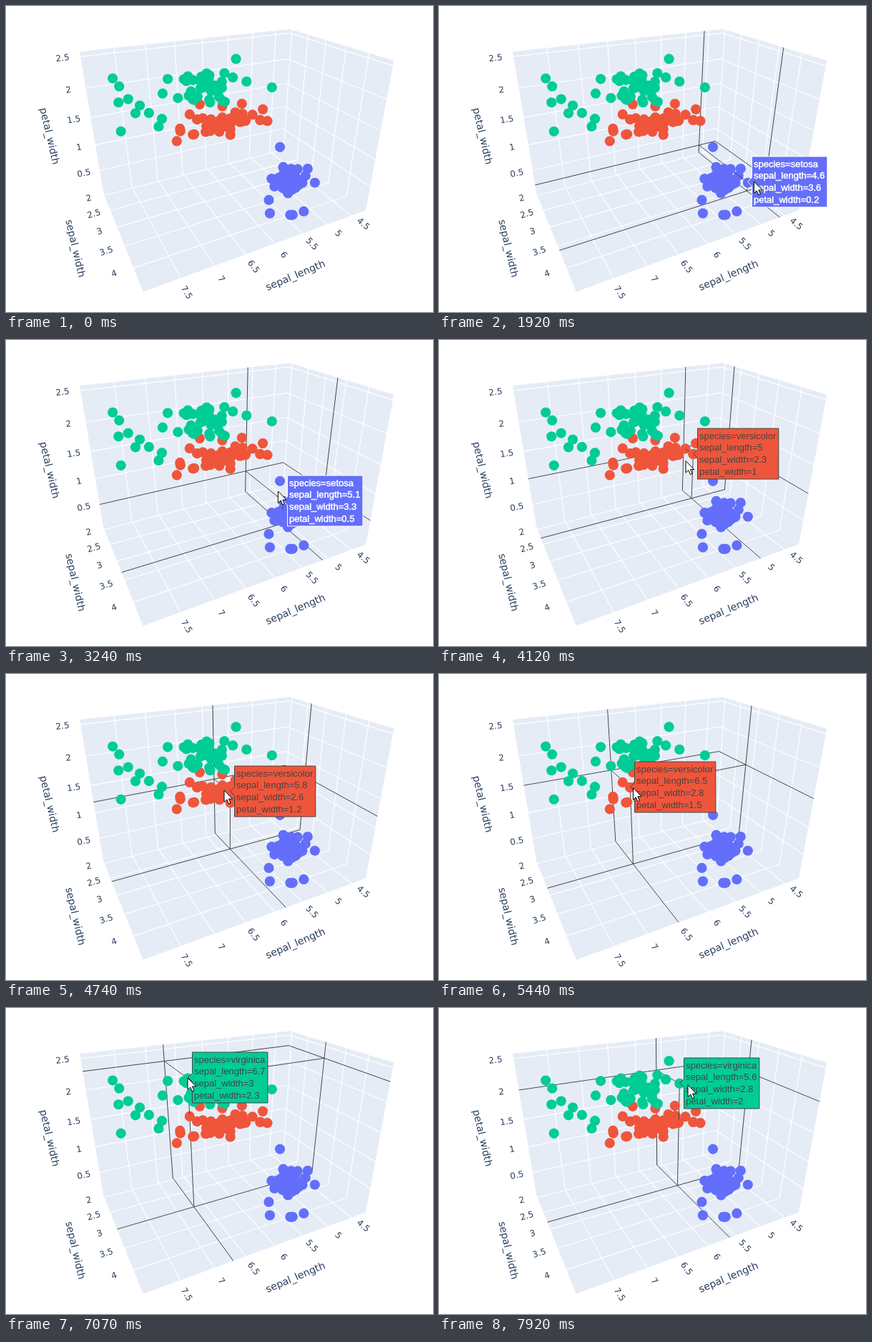
Write an HTML page with a canvas that moves like this. It is 597 px wide and 429 px high and loops after 8 s.

```html
<!DOCTYPE html>
<html lang="en">
<head>
<meta charset="utf-8">
<title>Iris 3D scatter</title>
<style>
html, body { margin: 0; width: 100%; height: 100%; overflow: hidden; background: #fff; }
canvas { display: block; }
</style>
</head>
<body>
<canvas id="stage" width="597" height="429"></canvas>
<script>
const ctx = document.getElementById('stage').getContext('2d');
const LOOP = 8000, STEP = 78;

// All measures are in tenths. Tick labels sit beside an edge of the box,
// shifted and turned a little more with every tick.
const axes = [
  { name: 'sepal_length', low: 41.875, span: 38.25, ticks: [45, 75], edge: [0, 1, 0],
    dx: i => 16 - 1.35 * i, dy: i => 12 + 1.4 * i, turn: i => 41 + 3 * i, title: [405, 378.5, -23] },
  { name: 'sepal_width', low: 19.25, span: 25.5, ticks: [20, 40], edge: [1, 0, 0],
    dx: i => -21.5 - 1.4 * i, dy: i => 4.5 + i, turn: i => -15 - i, title: [96, 340, 77] },
  { name: 'petal_width', low: 0.25, span: 25.5, ticks: [5, 25], edge: [1, 0, 0],
    dx: i => -22 - 0.75 * i, dy: i => 4.5 - 0.4 * i, turn: i => i - 11, title: [60, 182.5, 77] }
];

// Each species: a random cloud around its mean, and the flowers that stand apart
const species = [
  { name: 'setosa', color: '#636efa', ink: '#fff', bold: true,
    count: 36, mean: [49.5, 33.8, 2.4], spread: [5, 4.5, 1.5],
    apart: [[43, 30, 1], [57, 44, 4], [55, 42, 2], [52, 41, 1], [58, 40, 2], [57, 38, 3],
      [54, 34, 4], [54, 39, 4]] },
  { name: 'versicolor', color: '#ef553b', ink: '#444',
    count: 34, mean: [59.5, 27.8, 13], spread: [6, 4, 2.6],
    apart: [[70, 32, 14], [68, 28, 14], [67, 31, 14], [69, 31, 15], [67, 30, 17], [66, 29, 13],
      [49, 24, 10], [50, 20, 10], [52, 27, 14], [62, 22, 15], [60, 22, 10], [60, 34, 16], [59, 32, 18]] },
  { name: 'virginica', color: '#00cc96', ink: '#444',
    count: 26, mean: [64, 30, 20.5], spread: [5, 4, 3.5],
    apart: [[77, 26, 23], [77, 28, 20], [77, 30, 23], [77, 38, 22], [79, 38, 20], [76, 30, 21],
      [74, 28, 19], [73, 29, 18], [72, 36, 25], [72, 32, 18], [72, 30, 16], [71, 30, 21],
      [49, 25, 17], [57, 25, 20], [58, 28, 24], [60, 22, 15], [67, 25, 18], [63, 34, 24]] }
];

// Pointer strokes: where each ends, and the flowers touched on the way
const entry = { x: 527, y: 429 };
const moves = [
  { from: 980, to: 1750, x: 460, y: 250, touch: [] },
  { from: 1830, to: 2160, x: 411, y: 240, touch: [[46, 36, 2], [48, 34, 2]] },
  { from: 2300, to: 2700, x: 388, y: 227, touch: [[50, 34, 4], [51, 33, 5]] },
  { from: 3090, to: 3880, x: 360, y: 172, touch: [[51, 33, 5], [45, 23, 3], [50, 23, 10]] },
  { from: 3960, to: 4740, x: 305, y: 163, touch: [[50, 23, 10], [55, 25, 13], [58, 26, 12]] },
  { from: 4820, to: 5600, x: 264, y: 159, touch: [[60, 27, 16], [65, 28, 15]] },
  { from: 5660, to: 5820, x: 261, y: 159, touch: [[65, 28, 15]] },
  { from: 6290, to: 6670, x: 270, y: 106, touch: [[63, 25, 19], [65, 30, 22]] },
  { from: 6840, to: 7070, x: 254, y: 98, touch: [[65, 30, 22], [67, 30, 23]] },
  { from: 7770, to: 7920, x: 348, y: 108, touch: [[64, 28, 22], [56, 28, 20]] }
];

// Perspective of the unit cube: screen place of the back corner, and of the ends
// of the three edges leaving it, each with its weight
const corner = [385.6, 199.5];
const ends = [[136.3, 262.6, 0.821], [503, 286.5, 0.769], [396.7, 32.2, 0.869]];

function project(p) {
  let w = 1 - p[0] - p[1] - p[2], x = w * corner[0], y = w * corner[1];
  ends.forEach(([ex, ey, k], i) => { x += p[i] * k * ex; y += p[i] * k * ey; w += p[i] * k; });
  return { x: x / w, y: y / w, depth: w };
}

const unit = (value, i) => (value - axes[i].low) / axes[i].span;
const kindOf = flower => species[flower[2] < 8 ? 0 : flower[2] < 17 ? 1 : 2];

let seed = 7;
function noise() {
  seed = seed * 16807 % 2147483647;
  return seed / 1073741823.5 - 1;
}

function cloud({ count, mean, spread }) {
  return Array.from({ length: count }, () => {
    const size = noise();
    return mean.map((m, i) => Math.round(m + spread[i] * (0.55 * size + 0.45 * noise())));
  });
}

const dot = (flower, kind) => ({ ...project(flower.map(unit)), color: kind.color });
const dots = [
  ...species.flatMap(kind => [...kind.apart, ...cloud(kind)].map(f => dot(f, kind))),
  ...moves.flatMap(m => m.touch).map(f => dot(f, kindOf(f)))
];

// Pointer place and touched flower; movement goes in steps, then rests
function stateAt(t) {
  const n = moves.filter(m => m.from <= t).length - 1;
  if (n < 0) return {};
  const { from, to, x, y, touch } = moves[n], start = moves[n - 1] || entry;
  const count = Math.round((to - from) / STEP) + 1;
  const k = Math.min(count - 1, Math.floor((t - from + 10) * (count - 1) / (to - from)));
  const part = (k + 1) / count;
  return {
    pointer: [start.x + (x - start.x) * part, start.y + (y - start.y) * part],
    flower: touch[Math.floor(k * touch.length / count)]
  };
}

function segment(a, b) {
  ctx.beginPath();
  ctx.moveTo(a.x, a.y);
  ctx.lineTo(b.x, b.y);
  ctx.stroke();
}

function shape(points, fill, line) {
  ctx.beginPath();
  points.forEach(([x, y]) => ctx.lineTo(x, y));
  ctx.closePath();
  ctx.fillStyle = fill;
  ctx.fill();
  if (!line) return;
  ctx.strokeStyle = line;
  ctx.lineWidth = 1;
  ctx.stroke();
}

// Lines at one value of an axis, on the two walls that show it
function rule(axis, value) {
  for (let along = 0; along < 3; along++) {
    if (along === axis) continue;
    const a = [0, 0, 0];
    a[axis] = value;
    const b = [...a];
    b[along] = 1;
    segment(project(a), project(b));
  }
}

function label(text, x, y, degrees, size) {
  ctx.save();
  ctx.translate(x, y);
  ctx.rotate(degrees * Math.PI / 180);
  ctx.font = size + 'px "DejaVu Sans", sans-serif';
  ctx.textAlign = 'center';
  ctx.textBaseline = 'middle';
  ctx.fillStyle = '#2a3f5f';
  ctx.fillText(text, 0, 0);
  ctx.restore();
}

function drawBox() {
  const outline = [[1, 0, 0], [1, 0, 1], [0, 0, 1], [0, 1, 1], [0, 1, 0], [1, 1, 0]].map(project);
  shape(outline.map(q => [q.x, q.y]), '#e5ecf6');
  axes.forEach(({ name, ticks: [first, last], edge, dx, dy, turn, title }, axis) => {
    ctx.strokeStyle = '#fff';
    ctx.lineWidth = 1.2;
    for (let v = first, i = 0; v <= last; v += 5, i++) {
      const at = [...edge];
      at[axis] = unit(v, axis);
      rule(axis, at[axis]);
      const { x, y } = project(at);
      label(v / 10, x + dx(i), y + dy(i), turn(i), 12);
    }
    label(name, ...title, 14);
  });
}

// Lines from a point to the walls, in pieces that sort with the dots
function dropLines(p) {
  const pieces = [], count = 24;
  p.forEach((_, axis) => {
    const at = k => project(p.map((v, i) => i === axis ? v * k / count : v));
    for (let k = 0; k < count; k++) {
      const a = at(k), b = at(k + 1);
      pieces.push({ a, b, depth: (a.depth + b.depth) / 2 });
    }
  });
  return pieces;
}

function drawItem(item) {
  if (item.a) return segment(item.a, item.b);
  ctx.fillStyle = item.color;
  ctx.beginPath();
  ctx.arc(item.x, item.y, 7.1, 0, 2 * Math.PI);
  ctx.fill();
}

function drawTip(flower) {
  const { name, color, ink, bold } = kindOf(flower), { x, y } = project(flower.map(unit));
  const lines = ['species=' + name, ...axes.map((a, i) => a.name + '=' + flower[i] / 10)];
  ctx.font = '13px "Liberation Sans", Arial, sans-serif';
  const left = Math.floor(x) + 6.5, mid = Math.round(y - 0.3) - 0.5, half = 35.5;
  const right = left + 6 + Math.max(...lines.map(l => ctx.measureText(l).width));
  shape([[left - 6, mid], [left, mid - 6], [left, mid - half], [right, mid - half],
    [right, mid + half], [left, mid + half], [left, mid + 6]], color, ink);
  ctx.fillStyle = ink;
  ctx.lineWidth = 0.5;
  lines.forEach((l, i) => {
    const place = [l, left + 2.5, mid - half + 14.5 + i * 16.9];
    ctx.fillText(...place);
    if (bold) ctx.strokeText(...place);
  });
}

function drawPointer([x, y]) {
  const arrow = [[0, 0], [0, 16.5], [3.8, 13], [6.4, 19], [9, 17.9], [6.5, 12], [11.7, 12]];
  shape(arrow.map(([dx, dy]) => [x + dx, y + dy]), '#fff', '#000');
}

function draw(time) {
  const { pointer, flower } = stateAt(time % LOOP);
  ctx.fillStyle = '#fff';
  ctx.fillRect(0, 0, 597, 429);
  drawBox();

  let items = [...dots];
  if (flower) {
    const point = flower.map(unit);
    ctx.strokeStyle = '#444';
    ctx.lineWidth = 1;
    point.forEach((v, axis) => rule(axis, v));
    items.push(...dropLines(point));
  }
  items.sort((a, b) => b.depth - a.depth).forEach(drawItem);
  if (flower) drawTip(flower);
  if (pointer) drawPointer(pointer);
}

const began = performance.now();
function frame() {
  draw(performance.now() - began);
  requestAnimationFrame(frame);
}
frame();
</script>
</body>
</html>
```
